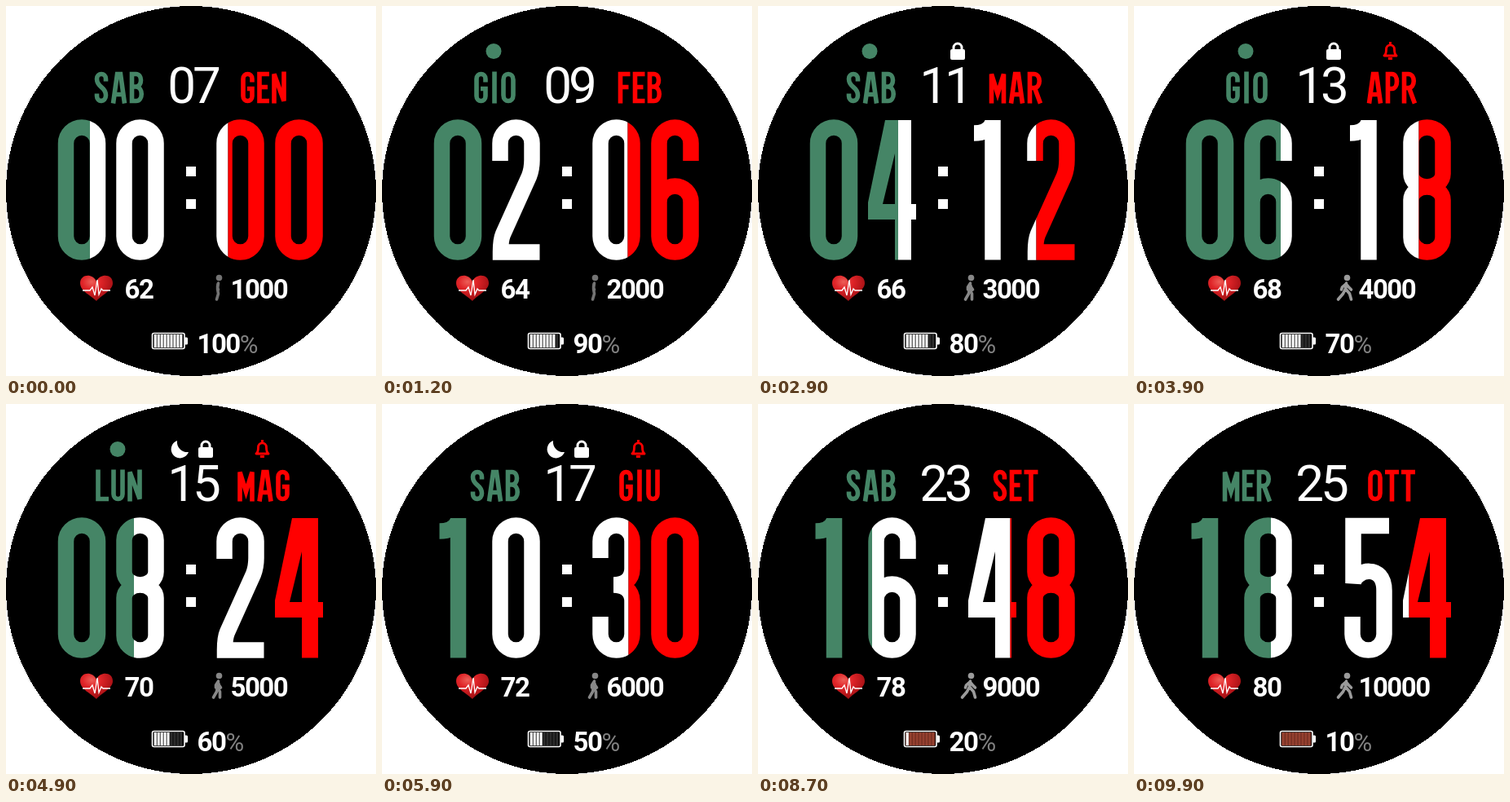
Recreate the animation shown at these times as an HTML page. Size 454 by 454 pixels, loop 10 s.

```html
<!DOCTYPE html>
<html lang="it">
<head>
<meta charset="utf-8">
<title>Quadrante tricolore</title>
<style>
  html, body { margin: 0; width: 100%; height: 100%; overflow: hidden; background: #fff; }
  svg { display: block; width: 454px; height: 454px; }
  text { font-family: Roboto, Inter, sans-serif; fill: #fff; }
  .day { font-size: 62px; letter-spacing: -4px; }
  .num { font-size: 33px; font-weight: 700; letter-spacing: -1.5px; }
  .pct { font-size: 31px; font-weight: 400; fill: #808080; }
  .big path { stroke-width: 19.5; fill: none; }
  .big .solid { fill: currentColor; stroke: none; fill-rule: evenodd; }
  .word path { stroke-width: 5.6; fill: none; }
  .green { color: #458566; stroke: currentColor; }
  .white { color: #fff; stroke: currentColor; }
  .red { color: #f00; stroke: currentColor; }
</style>
</head>
<body>
<svg viewBox="0 0 454 454">
  <defs>
    <clipPath id="left"><rect id="leftBox" x="0" y="130" height="190"/></clipPath>
    <clipPath id="middle"><rect id="middleBox" y="130" width="169.500" height="190"/></clipPath>
    <clipPath id="right"><rect id="rightBox" y="130" width="300" height="190"/></clipPath>
    <radialGradient id="blood" cx=".35" cy=".25" r=".8">
      <stop offset="0" stop-color="#ec5f58"/>
      <stop offset=".35" stop-color="#e02428"/>
      <stop offset="1" stop-color="#960c10"/>
    </radialGradient>
  </defs>

  <circle cx="227" cy="227" r="227" shape-rendering="crispEdges"/>

  <circle id="link" cx="137" cy="55.5" r="9.5" fill="#458566"/>
  <path id="moon" fill="#fff" d="M210 45A11 11 0 1 0 224 59A12.500 12.500 0 0 1 210 45Z"/>
  <g id="lock">
    <rect x="236" y="53" width="18" height="13" rx="2" fill="#fff"/>
    <path d="M240 54V51a5 5 0 0 1 10 0V54" fill="none" stroke="#fff" stroke-width="3"/>
  </g>
  <g id="bell" fill="none" stroke="#f00" stroke-width="2.900">
    <path d="M307 61C309.500 59 309.500 57 309.500 53.500C309.500 46 319.500 46 319.500 53.500C319.500 57 319.500 59 322 61Z" stroke-linejoin="round"/>
    <path d="M312 64.500H317M314.500 44V47"/>
  </g>

  <g id="week" class="word green"></g>
  <g id="month" class="word red"></g>
  <text id="day" class="day" x="229" y="118.500" text-anchor="middle"></text>

  <g id="hours" class="big green" clip-path="url(#left)"></g>
  <g id="centre" class="big white" clip-path="url(#middle)"></g>
  <g id="minutes" class="big red" clip-path="url(#right)"></g>
  <path fill="#fff" d="M221 197h12v12h-12zM221 237h12v12h-12z"/>

  <path fill="url(#blood)" d="M111 362C104 355 91 350 91 340C91 329 106 327 111 338C115 328 131 328 131 340C131 349 118 354 111 362Z"/>
  <path fill="none" stroke="#fff" stroke-width="1.300" d="M94 349H103L106 345L109 355L112 336L114 354L117 347L119 349H128"/>
  <text id="pulse" class="num" x="145.500" y="359"></text>

  <g fill="none" stroke-width="3.600" stroke-linecap="round" stroke-linejoin="round">
    <circle id="head" cx="261.500" cy="333.500" r="3.800" stroke="none"/>
    <path id="limbs"/>
  </g>
  <text id="steps" class="num" x="275.500" y="359"></text>

  <rect x="179.500" y="401.500" width="39.500" height="19" rx="2" fill="none" stroke="#fff" stroke-width="1.600"/>
  <path d="M219.500 406.500h2a1.500 1.500 0 0 1 1.500 1.500v6a1.500 1.500 0 0 1-1.500 1.500h-2z" fill="#fff"/>
  <g id="bars"></g>
  <text class="num" x="234.500" y="426"><tspan id="charge"></tspan><tspan class="pct">%</tspan></text>
</svg>
<script>
const $ = id => document.getElementById(id);

// Large numerals, each in a 59 x 173 box
const round = 'a19.500 19.500 0 0 ';
const numerals = {
  0: `M10 29.500${round}1 39 0V143.500${round}1-39 0Z`,
  1: 'M30 1V172.500M7 17Q24 17 29 6',
  2: `M10 51V29.500${round}1 39 0V50Q49 61 45.500 70L13.500 141Q10.500 148 10.500 163H58.500`,
  3: `M10 50V29.500${round}1 39 0V63C49 76 40 83 26 83C40 83 49 90 49 103V143.500${round}1-39 0V122`,
  4: 'M21 1H53V104H59V123H53V172.500H33V123H0V102ZM33 42V104H18Z',
  5: `M55 10.500H11V81C13 64 49 56 49 90V143.500${round}1-39 0V122`,
  6: `M49 51V29.500${round}0-39 0V143.500${round}0 39 0V101.500${round}0-39 0`,
  8: 'M10 28a19.500 18 0 0 1 39 0V67a19.500 16 0 0 1-39 0ZM10 99a19.500 16 0 0 1 39 0V145a19.500 18 0 0 1-39 0Z'
};

// Narrow capitals, 39 high: [width, path]
const letters = {
  A: [20, 'M3 39L8 3H12L17 39M5 28H15'],
  B: [17, 'M3 3H8C16 3 16 18 8 18.500H3H8C17 19 17 36 8 36H3Z'],
  E: [15, 'M15 3H3V36H15M3 19H13'],
  F: [15, 'M15 3H3V39M3 19H13'],
  G: [17, 'M14 13V9C14 1 3 1 3 9V30C3 38 14 38 14 30V21H8'],
  I: [10, 'M5 0V39'],
  L: [16, 'M3 0V36H16'],
  M: [21, 'M3 39V3L10.500 27L18 3V39'],
  N: [18, 'M3 39V3L15 36V0'],
  O: [18, 'M3 10C3 .600 15 .600 15 10V29C15 38.400 3 38.400 3 29Z'],
  P: [17, 'M3 39V3H8C16 3 16 21 8 21H3'],
  R: [18, 'M3 39V3H8C17 3 17 20 8 20H3M9 20L16 39'],
  S: [17, 'M14 12V9C14 1 3 1 3 9C3 20 14 18 14 29C14 38 3 38 3 30V27'],
  T: [17, 'M0 3H17M8.500 3V39'],
  U: [17, 'M3 0V30C3 38 14 38 14 30V0']
};

const weekdays = 'SAB GIO SAB GIO LUN SAB MER LUN SAB MER'.split(' ');
const months = 'GEN FEB MAR APR MAG GIU LUG AGO SET OTT'.split(' ');
const two = n => String(n).padStart(2, '0');

function bigPair(n, xs) {
  return [...two(n)].map((c, i) => {
    const look = c === '4' ? ' class="solid"' : '';
    return `<path transform="translate(${xs[i]} 139)" d="${numerals[c]}"${look}/>`;
  }).join('');
}

function word(text, center) {
  const gap = 3;
  const glyphs = [...text].map(c => letters[c]);
  let x = center - (glyphs.reduce((sum, g) => sum + g[0] + gap, -gap)) / 2;
  return glyphs.map(([w, d]) => {
    const out = `<path transform="translate(${x} 80.500)" d="${d}"/>`;
    x += w + gap;
    return out;
  }).join('');
}

function battery(charge) {
  const low = charge <= 20;
  const full = charge / 10 - 1;
  let out = `<rect x="181" y="403" width="36.500" height="16" fill="${low ? '#5e241b' : '#000'}"/>`;
  for (let i = 0; i < 9; i++) {
    const fill = i < full ? '#fff' : low ? '#94402f' : '#2c2c2c';
    out += `<rect x="${181.7 + i * 3.95}" y="403" width="3.100" height="16" fill="${fill}"/>`;
  }
  return out;
}

function show(id, on) {
  $(id).style.display = on ? '' : 'none';
}

function setState(k) {
  const h = bigPair(2 * k, [63.5, 135]);
  const m = bigPair(6 * k, [258, 330]);
  $('hours').innerHTML = h;
  $('centre').innerHTML = h + m;
  $('minutes').innerHTML = m;
  $('week').innerHTML = word(weekdays[k], 138.5);
  $('month').innerHTML = word(months[k], 316);
  $('day').textContent = two(7 + 2 * k);
  $('pulse').textContent = 62 + 2 * k;
  $('steps').textContent = 1000 * (k + 1);
  $('charge').textContent = 100 - 10 * k;
  $('bars').innerHTML = battery(100 - 10 * k);
  // Each icon stays for four states
  ['link', 'lock', 'bell', 'moon'].forEach((id, i) => show(id, k > i && k <= i + 4));
}

// The white band glides right and back at constant speed
function setBand(t) {
  const period = 7150, speed = 0.0238;
  const p = t % period;
  const x = Math.round(103 + speed * Math.min(p, period - p));
  $('leftBox').setAttribute('width', x);
  $('middleBox').setAttribute('x', x);
  $('rightBox').setAttribute('x', x + 169.5);
}

function setWalker(t) {
  const s = Math.sin(t / 1200 * 2 * Math.PI);
  const leg = a => `M259.500 347L${260.5 + 4 * a} 353L${258.5 + 8 * a} 360`;
  const arm = a => `M260 341L${259.5 + 4 * a} 345L${260.5 + 6 * a} 348`;
  const tone = Math.round(115 + 40 * Math.abs(s));
  const grey = `rgb(${tone},${tone},${tone})`;
  $('limbs').setAttribute('d', 'M260.500 340L259.500 347' + leg(s) + leg(-s) + arm(s) + arm(-s));
  $('limbs').setAttribute('stroke', grey);
  $('head').setAttribute('fill', grey);
}

const start = performance.now();
let state = -1;

function frame() {
  const t = Math.floor((performance.now() - start) % 10000 / 100) * 100;
  const k = Math.floor(t / 1000);
  if (k !== state) setState(state = k);
  setBand(t);
  setWalker(t);
  requestAnimationFrame(frame);
}
frame();
</script>
</body>
</html>
```
